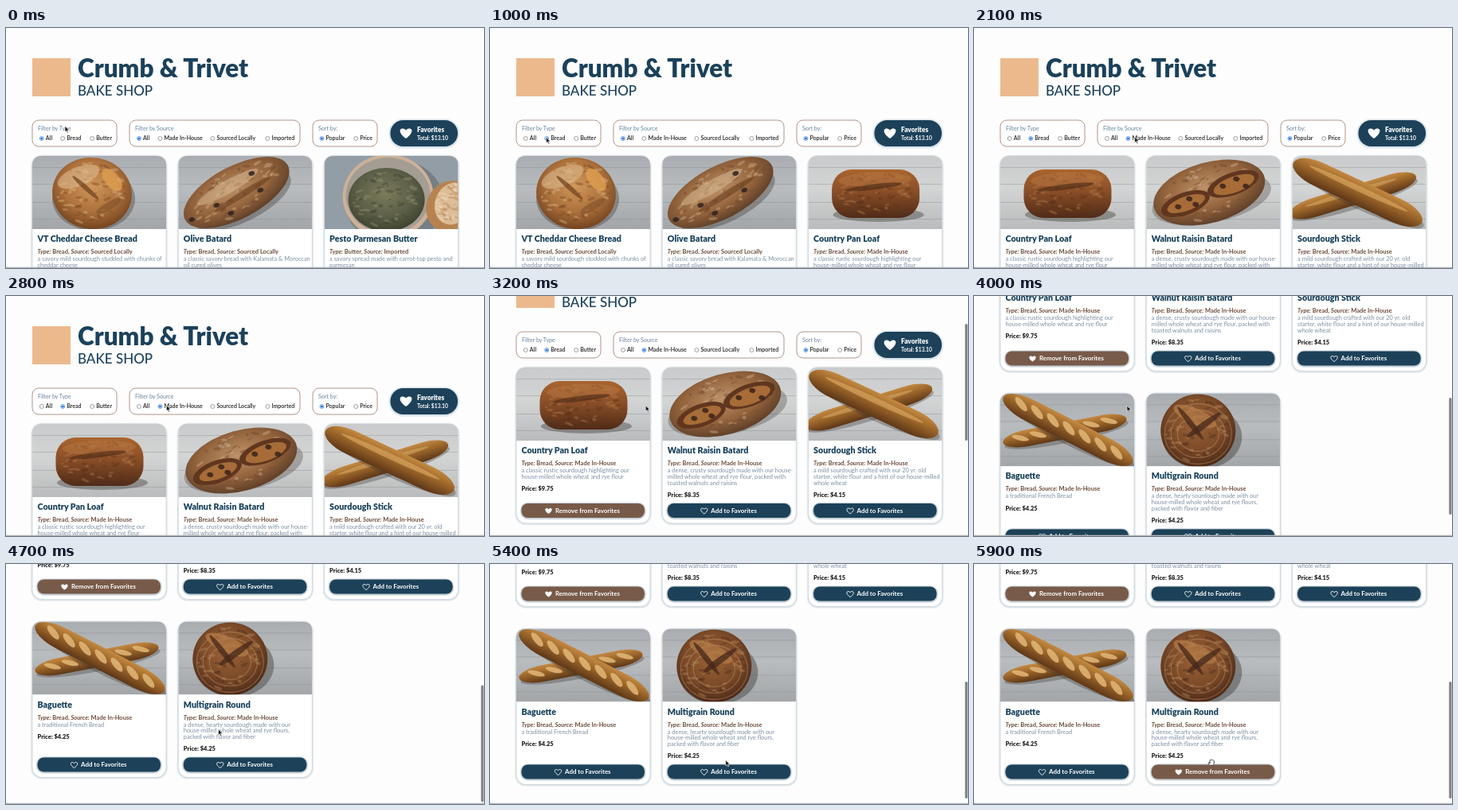
An HTML page that plays this animation: 600x302 px, repeating every 6 s.

```html
<!DOCTYPE html>
<html lang="en">
<head>
<meta charset="utf-8">
<title>Bake shop</title>
<style>
  html, body { margin: 0; width: 100%; height: 100%; overflow: hidden; background: #fdfdfd; }
  svg { display: block; }
  text { font-family: Lato, "Open Sans", sans-serif; white-space: pre; }
  .brand { font-size: 31.5px; font-weight: 900; fill: #1b415b; }
  .sub { font-size: 17px; font-weight: 500; fill: #1b415b; }
  .label { font-size: 7.1px; fill: #64829f; }
  .option { font-size: 7.1px; font-weight: 600; fill: #222; }
  .fav { font-size: 8.3px; font-weight: 900; fill: #fff; }
  .total { font-size: 6.7px; font-weight: 700; fill: #fff; }
  .name { font-size: 10.7px; font-weight: 900; fill: #17405a; }
  .kind { font-size: 7.5px; font-weight: 700; fill: #6d4c3c; }
  .kind tspan { font-style: italic; }
  .desc { font-size: 7.4px; fill: #7b8fa3; }
  .price { font-size: 7.5px; font-weight: 900; fill: #222; }
  .button { font-size: 7.9px; font-weight: 700; fill: #fff; }
</style>
</head>
<body>
<svg id="stage" width="600" height="302" viewBox="0 0 600 302">
  <defs id="defs"></defs>
  <rect width="600" height="302" fill="#fdfdfd"/>
  <g id="page"></g>
  <rect id="thumb" x="596.3" width="3.2" height="147" rx="1.6" fill="#808080"/>
  <rect y="300.8" width="600" height="1.2" fill="#b4b6b8"/>
  <path id="arrow" d="M0 0V7.2L1.7 5.7L2.9 8.4L4.1 7.9L2.9 5.3H5.2Z" fill="#111" stroke="#fff" stroke-width=".6"/>
  <path id="hand" d="M-1.6 2V-2.2Q-.8-3.4 0-2.2Q.8-3.2 1.5-2.2Q2.4-2.8 3-1.8Q4-2 4 0Q4 3 2.6 4.4H-1.6L-3.4 1.6Q-3-.2-1.6 1Z" fill="#eee" stroke="#333" stroke-width=".8"/>
</svg>
<script>
const $ = id => document.getElementById(id);
const LOOP = 6000, NAVY = '#1c4159', BROWN = '#785a49';

// Drawing helpers
const text = (x, y, cls, s) => `<text x="${x}" y="${y}" class="${cls}">${s}</text>`;
const box = (x, y, w, h, r, attrs) => `<rect x="${x}" y="${y}" width="${w}" height="${h}" rx="${r}" ${attrs}/>`;
const oval = (x, y, rx, ry, turn, fill, alpha = 1) =>
  `<ellipse rx="${rx}" ry="${ry}" transform="translate(${x} ${y}) rotate(${turn})" fill="${fill}" opacity="${alpha}"/>`;
const heart = (x, y, size, attrs) =>
  `<path transform="translate(${x} ${y}) scale(${size})" d="M0 4.2C-8-1.2-4-6 0-2.4C4-6 8-1.2 0 4.2Z" ${attrs}/>`;
const glow = (x, y, w, h, r, color, reach) => [3, 2, 1].map(i => {
  const d = i * reach / 3;
  return box(x - d, y - d + .5, w + 2 * d, h + 2 * d, r + d, `fill="${color}" opacity=".2"`);
}).join('');

// Photo gradients: centre, middle and edge tones
const radial = (id, a, b, c) => `<radialGradient id="${id}" cx=".48" cy=".4" r=".6"><stop stop-color="${a}"/>
  <stop offset=".6" stop-color="${b}"/><stop offset="1" stop-color="${c}"/></radialGradient>`;
const linear = (id, a, b, c) => `<linearGradient id="${id}" x2="0" y2="1"><stop stop-color="${a}"/>
  <stop offset=".45" stop-color="${b}"/><stop offset="1" stop-color="${c}"/></linearGradient>`;
$('defs').innerHTML = radial('gold', '#cf975a', '#ad713c', '#744420') + radial('rustic', '#bd9269', '#94643d', '#5f3f28') +
  radial('dark', '#9c6236', '#7c4b29', '#4c2a18') + radial('pesto', '#7b7a5a', '#5d6048', '#3f432f') +
  linear('loaf', '#a9652f', '#8a4e27', '#4f2b18') + linear('stick', '#c48a42', '#9a6429', '#5d3717') +
  linear('wood', '#a9adb1', '#b9bcbe', '#a3a6a9') + linear('pale', '#c9cbcc', '#d3d4d4', '#b9bbbc') +
  '<clipPath id="frame"><path d="M0 92V12Q0 0 12 0H156Q168 0 168 12V92Z"/></clipPath>';

const planks = fill => box(0, 0, 168, 92, 0, `fill="url(#${fill})"`) +
  [14, 35, 58, 79].map(y => box(0, y, 168, .8, 0, 'fill="#7f8488" opacity=".45"')).join('');

// Seeded flecks spread over an ellipse
function flecks(x, y, rx, ry, turn, light, dark) {
  let seed = 7, out = '';
  const random = () => (seed = seed * 16807 % 2147483647) / 2147483647;
  for (let i = 0; i < 70; i++) {
    const a = random() * 6.283, r = Math.sqrt(random()) * .9;
    out += oval(Math.cos(a) * r * rx, Math.sin(a) * r * ry, 1.5 + 4 * random(), .7 + 1.5 * random(), random() * 60 - 30, i % 2 ? light : dark, .4);
  }
  return `<g transform="translate(${x} ${y}) rotate(${turn})">${out}</g>`;
}

const stick = (x, y, length, width, turn, cuts) => {
  let marks = '';
  for (let i = 0; i < cuts; i++)
    marks += oval(((i + .5) / cuts - .5) * length * .86, -width * .08, length / cuts * .42, width * .15, 24, '#e2b878', .85);
  return oval(x + 2, y + 5, length / 2, width / 2, turn, '#3c3a38', .35) +
    `<g transform="translate(${x} ${y}) rotate(${turn})"><rect x="${-length / 2}" y="${-width / 2}" width="${length}"
      height="${width}" rx="${length * .2}" ry="${width / 2}" fill="url(#stick)"/>${marks}</g>`;
};

const photos = {
  cheddar: () => planks('wood') + oval(77, 54, 52, 40, 0, '#44403c', .4) + oval(75, 47, 50, 45, 8, 'url(#gold)') +
    flecks(75, 47, 48, 43, 0, '#dcb98c', '#76451f') + oval(58, 26, 28, 12, -22, '#e2c296', .55) + oval(100, 30, 17, 9, 50, '#e0a250', .75) +
    oval(67, 40, 22, 3, 42, '#70401d', .7) + oval(96, 63, 18, 5, -30, '#80502a', .6),
  olive: () => planks('wood') + oval(79, 55, 68, 28, -26, '#44403c', .4) + oval(73, 46, 73, 33, -28, 'url(#rustic)') +
    flecks(73, 46, 70, 30, -28, '#d3b48c', '#6b4326') + oval(62, 39, 44, 8, -30, '#dabc94', .5) + oval(81, 48, 42, 4, -32, '#6b401f', .6) +
    [[17, 80], [48, 62], [66, 72], [103, 43], [92, 22]].map(p => oval(...p, 4, 2.8, -20, '#30231f', .85)).join(''),
  pesto: () => box(0, 0, 168, 92, 0, 'fill="#929da6"') + oval(88, 58, 62, 54, 0, '#565b5e', .45) +
    oval(80, 51, 57, 53, 0, '#cdb198') + oval(80, 50, 53, 48, 0, '#a39d94') + oval(78, 55, 48, 40, 0, 'url(#pesto)') +
    flecks(78, 55, 46, 38, 0, '#94926f', '#3a3f2d') +
    oval(158, 64, 30, 33, 20, '#b78250') + oval(161, 60, 22, 27, 20, '#dcbd97') + flecks(161, 60, 22, 27, 20, '#f0dcc0', '#b47d4c'),
  pan: () => planks('pale') + oval(88, 74, 57, 9, 0, '#4a4643', .45) + box(29.5, 17, 110, 61, 25, 'fill="url(#loaf)"') +
    flecks(84, 47, 52, 29, 0, '#b27a46', '#55301a') + oval(84, 30, 46, 9, -2, '#b97842', .5) + oval(82, 39, 36, 3.5, -7, '#553019', .7),
  walnut: () => planks('pale') + oval(82, 54, 76, 30, -12, '#4a4643', .35) + oval(79, 46, 72, 38, -16, 'url(#rustic)') +
    flecks(79, 46, 69, 36, -16, '#d3b699', '#69442c') + oval(49, 60, 32, 14, -20, '#60361f') + oval(109, 35, 34, 14, -20, '#60361f') +
    oval(50, 60, 25, 9, -20, '#a76c37') + oval(110, 36, 27, 10, -20, '#a76c37') +
    [[40, 64], [54, 54], [62, 61], [96, 38], [113, 29], [125, 38]].map(p => oval(...p, 4, 3, 15, '#3a241a', .85)).join(''),
  sticks: () => planks('pale') + stick(76, 50, 166, 24, -17, 0) + oval(74, 46, 60, 3, -17, '#ddb16d', .5) +
    stick(82, 46, 178, 31, 25, 0) + oval(83, 41, 68, 3.5, 25, '#dfae66', .6),
  baguette: () => planks('wood') + stick(81, 47, 158, 21, -11, 6) + stick(85, 46, 182, 28, 27, 7),
  round: () => planks('wood') + oval(70, 55, 50, 40, 0, '#3f3d3b', .45) + oval(65, 47, 47, 46, 0, 'url(#dark)') +
    flecks(65, 47, 45, 44, 0, '#b98a5a', '#4c2c1a') +
    [38, 30, 22].map(r => `<ellipse cx="65" cy="51" rx="${r + 4}" ry="${r}" fill="none" stroke="#c59a6c" stroke-width="1.3" opacity=".4"/>`).join('') +
    oval(61, 29, 29, 10, 24, '#b57d48', .7) + oval(72, 40, 26, 4, -36, '#45271a', .75) + oval(55, 37, 25, 3.5, 52, '#45271a', .75)
};

const product = (name, photo, source, price, desc, type = 'Bread') => ({ name, photo, source, price, desc, type });
const HOME = 'Made In-House', LOCAL = 'Sourced Locally';
const cheddar = product('VT Cheddar Cheese Bread', 'cheddar', LOCAL, '$7.50',
  ['a savory mild sourdough studded with chunks of', 'cheddar cheese']);
const olive = product('Olive Batard', 'olive', LOCAL, '$8.50',
  ['a classic savory bread with Kalamata &amp; Moroccan', 'oil cured olives']);
const pesto = product('Pesto Parmesan Butter', 'pesto', 'Imported', '$6.50',
  ['a savory spread made with carrot-top pesto and', 'parmesan'], 'Butter');
const pan = product('Country Pan Loaf', 'pan', HOME, '$9.75',
  ['a classic rustic sourdough highlighting our', 'house-milled whole wheat and rye flour']);
const walnut = product('Walnut Raisin Batard', 'walnut', HOME, '$8.35',
  ['a dense, crusty sourdough made with our house-', 'milled whole wheat and rye flour, packed with', 'toasted walnuts and raisins']);
const sticks = product('Sourdough Stick', 'sticks', HOME, '$4.15',
  ['a mild sourdough crafted with our 20 yr. old', 'starter, white flour and a hint of our house-milled', 'whole wheat']);
const baguette = product('Baguette', 'baguette', HOME, '$4.25', ['a traditional French Bread']);
const multigrain = product('Multigrain Round', 'round', HOME, '$4.25',
  ['a dense, hearty sourdough made with our', 'house-milled whole wheat and rye flours,', 'packed with flavor and fiber']);
const shelves = [[cheddar, olive, pesto], [cheddar, olive, pan], [pan, walnut, sticks, baguette, multigrain]];

function card(item, i, saved) {
  const n = item.desc.length, x = 33 + i % 3 * 183.3, y = 161 + Math.floor(i / 3) * 224;
  return `<g transform="translate(${x} ${y})">` + glow(0, 0, 168, 196, 12, '#b4c2cc', 2) +
    box(0, 0, 168, 196, 12, 'fill="#fff" stroke="#cbd4da" stroke-width=".8"') +
    `<g clip-path="url(#frame)">${photos[item.photo]()}</g>` +
    text(6.5, 108, 'name', item.name) +
    text(6.5, 123, 'kind', `<tspan>Type:</tspan> ${item.type}, <tspan>Source:</tspan> ${item.source}`) +
    item.desc.map((line, k) => text(6.5, 132 + k * 7.8, 'desc', line)).join('') +
    text(6.5, 139.4 + n * 7.8, 'price', 'Price: ' + item.price) +
    glow(6.5, 171, 154.5, 18, 8, '#7d91a0', 2) +
    box(6.5, 171, 154.5, 18, 8, `fill="${saved ? BROWN : NAVY}"`) +
    heart(saved ? 40.5 : 52.5, 180.3, .9, saved ? 'fill="#fff"' : 'fill="none" stroke="#fff"') +
    text(saved ? 49 : 61, 182.7, 'button', (saved ? 'Remove from' : 'Add to') + ' Favorites') + '</g>';
}

function fieldset(x, w, label, options, chosen) {
  return box(x, 116, w, 33, 8, 'fill="#fff" stroke="#9a7d6d" stroke-width=".8"') + text(x + 7, 129.3, 'label', label) +
    options.map(([name, cx], i) => {
      const on = i === chosen;
      return `<circle cx="${cx}" cy="139" r="2.5" fill="#fff" stroke="${on ? '#2f78dc' : '#777'}" stroke-width=".7"/>` +
        (on ? `<circle cx="${cx}" cy="139" r="1.6" fill="#2f78dc"/>` : '') + text(cx + 5, 141.3, 'option', name);
    }).join('');
}

const header = stage => box(33, 38, 48, 48, 0, 'fill="#ecb98d"') +
  text(90, 62, 'brand', 'Crumb &amp; Trivet') + text(90, 84.5, 'sub', 'BAKE SHOP') +
  fieldset(33, 106, 'Filter by Type', [['All', 44.8], ['Bread', 71.2], ['Butter', 108.2]], stage ? 1 : 0) +
  fieldset(155, 214, 'Filter by Source', [['All', 167], [HOME, 193.4], [LOCAL, 259.4], ['Imported', 328.4]], stage > 1 ? 1 : 0) +
  fieldset(385, 81, 'Sort by:', [['Popular', 396.4], ['Price', 439.2]], 0) +
  glow(482.5, 116, 84.5, 33, 16, '#a9bfce', 2.5) + box(482.5, 116, 84.5, 33, 16, `fill="${NAVY}"`) +
  heart(502, 132.3, 1.6, 'fill="#fff"') + text(516, 130.7, 'fav', 'Favorites') + text(516, 141.3, 'total', 'Total: $13.10');

// Smooth curve through [time, ...values] keys; it rests wherever a value repeats
function follow(keys, t) {
  const last = keys.length - 1, next = keys.findIndex(k => k[0] > t);
  if (next <= 0) return keys[next ? last : 0].slice(1);
  const a = keys[next - 1], b = keys[next], span = b[0] - a[0], u = (t - a[0]) / span;
  const slope = (i, c) => {
    const p = keys[Math.max(i - 1, 0)], k = keys[i], n = keys[Math.min(i + 1, last)];
    return (k[c] - p[c]) * (n[c] - k[c]) > 0 ? (n[c] - p[c]) / (n[0] - p[0]) : 0;
  };
  return a.slice(1).map((v, j) => {
    const c = j + 1;
    return v + (b[c] - v) * u * u * (3 - 2 * u) +
      span * u * (1 - u) * (slope(next - 1, c) * (1 - u) - slope(next, c) * u);
  });
}
const scrollKeys = [[2900, 0], [3200, 71], [3600, 231.5], [4100, 268], [4600, 312.5], [5000, 312.5], [5400, 303.5]];
const pointerKeys = [[100, 74, 123.5], [800, 70.5, 137.5], [1100, 70.5, 137.5], [1800, 191.5, 137],
  [3600, 192, 138], [4100, 192, 138], [4700, 266.5, 208], [4800, 266.5, 208], [5500, 297.5, 249]];

let shown = '';
function draw(now) {
  const t = Math.floor(now % LOOP / 100) * 100;
  const stage = t < 900 ? 0 : t < 1900 ? 1 : 2, liked = t >= 5700;
  if (shown !== stage + '/' + liked) {
    shown = stage + '/' + liked;
    $('page').innerHTML = header(stage) +
      shelves[stage].map((item, i) => card(item, i, item === pan && stage > 1 || item === multigrain && liked)).join('');
  }
  const [scroll] = follow(scrollKeys, t), [x, y] = follow(pointerKeys, t);
  $('page').setAttribute('transform', `translate(0 ${-scroll})`);
  $('thumb').setAttribute('y', .5 + scroll * .486);
  $('thumb').style.display = scroll > 0 ? '' : 'none';
  const overButton = t >= 5500;
  $('arrow').style.display = overButton ? 'none' : '';
  $('hand').style.display = overButton ? '' : 'none';
  for (const id of ['arrow', 'hand']) $(id).setAttribute('transform', `translate(${x} ${y})`);
  requestAnimationFrame(() => draw(performance.now() - start));
}
const start = performance.now();
draw(0);
</script>
</body>
</html>
```
